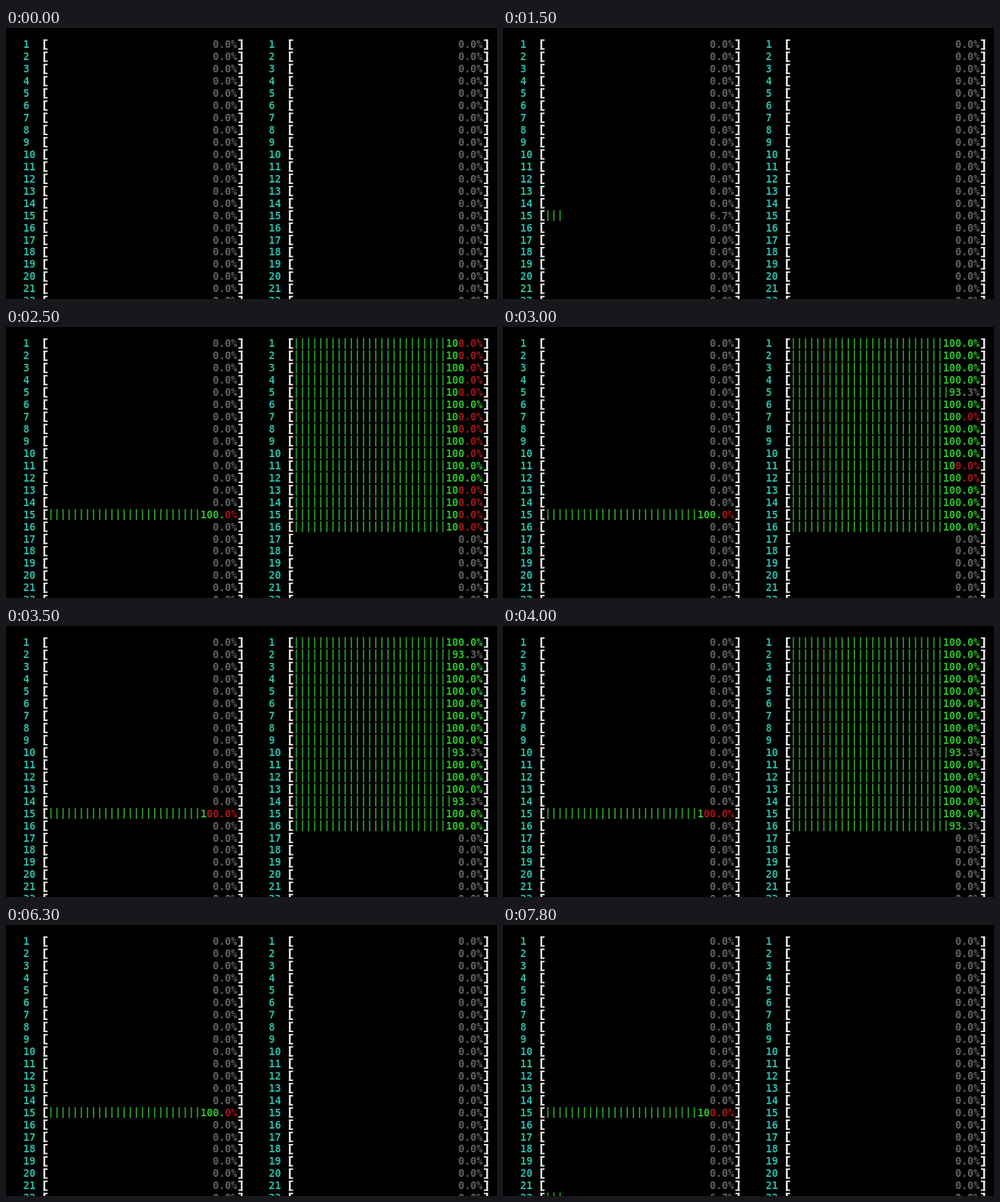
These frames come from a looping animation (640 by 354 pixels, 8000 ms). An HTML page with a canvas:

```html
<!DOCTYPE html>
<html lang="en">
<head>
<meta charset="utf-8">
<title>CPU meters</title>
<style>
html, body { margin: 0; width: 640px; height: 354px; overflow: hidden; background: #000; }
canvas { display: block; }
</style>
</head>
<body>
<canvas id="stage" width="640" height="354"></canvas>
<script>
const ctx = document.getElementById('stage').getContext('2d');
const LOOP = 8000, STEP = 100, ROWS = 22, CELLS = 31, CELL = 7.96, PITCH = 15.95;
const BUSY_ROW = 15, POOL = 16;
const CYAN = '#2bbba8', GREY = '#626262', GREEN = '#2cc02c', RED = '#a81414', WHITE = '#f0f0f0';
const BAR_GREEN = '#2a9c2a', BAR_RED = '#861212';
const FONT = 'bold 13.3px "DejaVu Sans Mono", monospace';

// A meter is its percentage, the green cells and all filled cells.
const meter = (value, green, filled = CELLS) => ({ value, green, filled });
const IDLE = meter(0, 0, 0), FULL = meter(100, CELLS), BLIP = meter(6.7, 3, 3);

// Start time and green cells of the lone busy core.
const busyKeys = [
  [1700, 29], [3500, 26], [4400, 31], [5200, 26], [5700, 29], [6600, 31], [7100, 29], [7600, 27]
];

function random(a, b) {
  const s = Math.sin(a * 12.9898 + b * 78.233) * 43758.5453;
  return s - Math.floor(s);
}

function leftMeter(row, t) {
  if (row === ROWS && t >= 7800) return BLIP;
  if (row !== BUSY_ROW || t < 1500) return IDLE;
  if (t < 1700) return BLIP;
  return meter(100, busyKeys.findLast(([start]) => start <= t)[1]);
}

// The first core launches the others, so it runs mostly kernel code.
function warmup(row, t) {
  const green = row === 1 ? 3 : 20 + Math.floor(random(row, t) * 6);
  return random(t, row) < 0.25 ? meter(100, green) : meter(92.9, green, 30);
}

// The red kernel share fades while the cores settle.
function steady(row, t) {
  const settled = Math.min(1, Math.max(0, (t - 2500) / 1000));
  const pick = random(row, t / STEP);
  if (pick < 0.17 * settled) return meter(93.3, 29, 29);
  if (pick > 0.2 + 0.8 * settled) return meter(100, random(t, row) < 0.6 ? 27 : 28);
  return FULL;
}

function rightMeter(row, t) {
  if (row > POOL || t < 1900 || t >= 4300) return IDLE;
  return t < 2200 ? warmup(row, t) : steady(row, t);
}

function glyph(char, x, y, color) {
  ctx.fillStyle = color;
  ctx.fillText(char, x, y + 4.8);
}

function bracket(x, y, dir) {
  ctx.fillStyle = WHITE;
  const box = (top, w, h) => ctx.fillRect(dir > 0 ? x : x - w, y + top, w, h);
  box(-6.6, 2.3, 13.4);
  box(-6.6, 5.4, 1.8);
  box(5, 5.4, 1.8);
}

function drawMeter(x, row, { value, green, filled }) {
  const y = 21.5 + (row - 1) * PITCH;
  [...String(row)].forEach((c, i) => glyph(c, x + 4 + i * CELL, y, CYAN));
  bracket(x + 26.3, y, 1);
  bracket(x + 285.8, y, -1);
  const text = (value.toFixed(1) + '%').padStart(CELLS);
  for (let i = 0; i < CELLS; i++) {
    const cx = x + 36 + i * CELL;
    if (text[i] !== ' ') {
      glyph(text[i], cx, y, i < green ? GREEN : i < filled ? RED : GREY);
    } else if (i < filled) {
      ctx.fillStyle = i < green ? BAR_GREEN : BAR_RED;
      ctx.fillRect(cx - 0.85, y - 7, 1.7, 14.2);
    }
  }
}

function draw(now) {
  const t = Math.floor((now % LOOP) / STEP) * STEP;
  ctx.fillStyle = '#000';
  ctx.fillRect(0, 0, 640, 354);
  ctx.font = FONT;
  ctx.textAlign = 'center';
  for (let row = 1; row <= ROWS; row++) {
    drawMeter(22.5, row, leftMeter(row, t));
    drawMeter(342.5, row, rightMeter(row, t));
  }
}

const start = performance.now();
function loop() {
  draw(performance.now() - start);
  requestAnimationFrame(loop);
}
loop();
</script>
</body>
</html>
```
